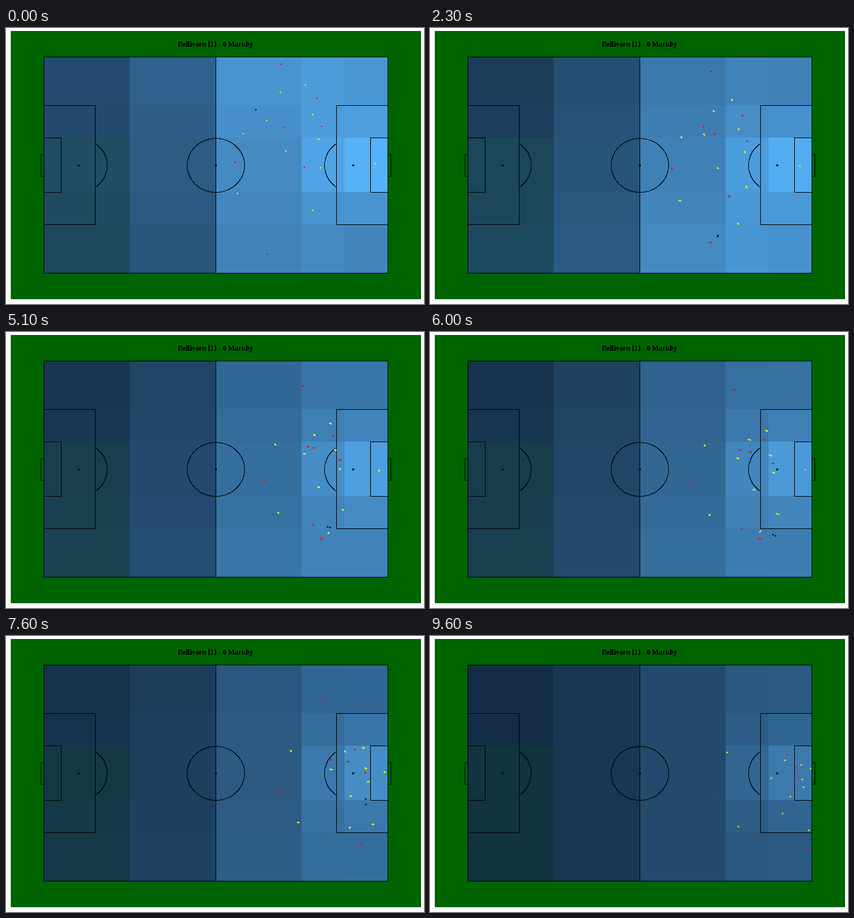
A matplotlib script for the animation above (10000 ms loop, 700 by 461 pixels).

```python
import numpy as np
import matplotlib.pyplot as plt
from matplotlib.animation import FuncAnimation
from matplotlib.patches import Rectangle

W, H, DPI = 700, 461, 64
PX = 72 / DPI                      # one pixel in points
END = 9.6                          # play stops here, then holds
RED, YELLOW, BLACK = (255, 0, 0), (255, 255, 0), (0, 0, 0)

X_EDGES = [63, 207, 351, 495, 567, 639]
Y_EDGES = [48, 129, 183, 274, 328, 409]

# Each player: start x, y, run dx, dy, and a sideways bow in y
REDS = [
    (460, 60, 88, 65, -5), (520, 117, 78, 81, 13), (418, 136, 195, 83, 13),
    (466, 166, 96, 53, -3), (528, 164, 89, 72, 11), (383, 224, 91, 44, 0),
    (499, 232, 43, 103, 35), (437, 377, 196, -22, -20),
]
YELLOWS = [
    (501, 95, 120, 120, -6), (459, 107, 135, 100, 11), (513, 144, 110, 95, 2),
    (397, 176, 100, 18, 2), (436, 154, 135, 83, 5), (523, 185, 102, 67, 8),
    (468, 205, 135, 63, 20), (526, 233, 108, 91, 15), (387, 276, 129, 42, 3),
    (513, 304, 77, -8, 36), (618, 226, 19, -5, 8),
]
# Ball touches: time, x, y
BALL = np.array([(0, 418, 136), (2.0, 478, 353), (4.1, 500, 311),
                 (6.2, 584, 342), (6.9, 597, 340), (8.0, 605, 240),
                 (END, 643, 243)]).T


def shade(v):
    """Dark to light blue ramp, slightly darker in the middle."""
    v = np.clip(v, 0, 1)[..., None]
    low, high = np.array([19, 43, 67]), np.array([86, 177, 247])
    return low + (high - low) * v - 4 * v * (1 - v) * np.array([1, 4, 5])


def grid_colors(t):
    """Each column fades at its own rate; rows tilt with the ball's side."""
    first = np.array([0.23, 0.39, 0.74, 0.79, 0.75])
    last = np.array([0.02, 0.10, 0.25, 0.36, 0.37])
    goal_pull = np.array([0, 0, 0, 0.12, 0.25])
    row = np.arange(-2, 3)[:, None]

    fade = (t / END) ** np.linspace(0.9, 1.8, 5)
    tilt = np.interp(t, [0, 2.3, 6, END], [-0.035, 0.035, 0.025, 0])
    v = (first + (last - first) * fade + tilt * row * np.sqrt(first)
         + goal_pull * np.exp(-row ** 2))
    rgb = shade(v)
    rgb[2:, 0] += (-2, 6, -6)
    return np.clip(rgb / 255, 0, 1)


def player_at(player, t):
    """Deep players run evenly; those near the goal hold, then go."""
    x, y, dx, dy, bow = player
    u = t / END
    late = (u * u * (3 - 2 * u)) ** 1.75
    lag = np.clip((x - 400) / 100, 0, 1)
    return (x + dx * (u + lag * (late - u)),
            y + dy * u + bow * np.sin(np.pi * u))


def ball_at(t):
    return np.interp(t, BALL[0], BALL[1]), np.interp(t, BALL[0], BALL[2])


def stamp(layer, place, t, color):
    """A 3 px plus, doubled along its way while moving."""
    half = 0.05 if 0 < t < END else 0
    for moment in (t - half, t + half):
        x, y = (int(round(c)) for c in place(moment))
        for part in (np.s_[y, x - 1:x + 2], np.s_[y - 1:y + 2, x]):
            layer[part] = (*color, 255)


def ring(layer, x, y, rx, ry, mid=0, reach=180):
    """One pixel wide ellipse, or the part within reach of the mid angle."""
    a = np.radians(np.linspace(mid - reach, mid + reach, 600))
    xs = np.rint(x + rx * np.cos(a)).astype(int)
    ys = np.rint(y + ry * np.sin(a)).astype(int)
    layer[ys, xs] = (*BLACK, 255)


def box(x0, y0, x1, y1):
    ax.add_patch(Rectangle((x0, y0), x1 - x0, y1 - y0, ec="black", fc="none",
                           lw=PX, antialiased=False, zorder=2))


fig = plt.figure(figsize=(W / DPI, H / DPI), dpi=DPI, facecolor="white")
ax = fig.add_axes([0, 0, 1, 1])
ax.axis("off")

ax.add_patch(Rectangle((8, 5), 687, 448, fc="#006400", lw=0,
                       antialiased=False, zorder=0))
cells = ax.pcolormesh(X_EDGES, Y_EDGES, grid_colors(0), antialiased=False,
                      zorder=1)

# Pitch markings, the right half mirrored about x = 351
box(63, 48, 639, 409)
box(63, 48, 351, 409)
for x0, x1, y0, y1 in [(63, 149, 129, 328), (63, 92, 183, 274),
                       (58, 63, 211, 247)]:
    box(x0, y0, x1, y1)
    box(702 - x1, y0, 702 - x0, y1)

marks = np.zeros((H, W, 4), np.uint8)
ring(marks, 351, 229, 48, 45)
ring(marks, 351, 229, 1, 1)
for x, mid in ((121, 0), (581, 180)):
    ring(marks, x, 229, 48, 45, mid, 54)
    marks[228:231, x - 1:x + 2] = (*BLACK, 255)

ax.text(350.5, 31, "Bellivorn [1] - 0 Marnby", ha="center", va="baseline",
        family="Liberation Serif", weight="bold", size=12 * PX,
        antialiased=False)

dots = ax.imshow(marks, extent=(0, W, H, 0), interpolation="nearest",
                 aspect="auto", zorder=3)
ax.set(xlim=(0, W), ylim=(H, 0))


def update(i):
    t = min(i / 10, END)
    cells.set_array(grid_colors(t))
    layer = marks.copy()
    for team, color in ((REDS, RED), (YELLOWS, YELLOW)):
        for player in team:
            stamp(layer, lambda s: player_at(player, s), t, color)
    stamp(layer, ball_at, t, BLACK)
    dots.set_data(layer)
    return cells, dots


anim = FuncAnimation(fig, update, frames=100, interval=100, repeat=True,
                     repeat_delay=0)
plt.show()
```
